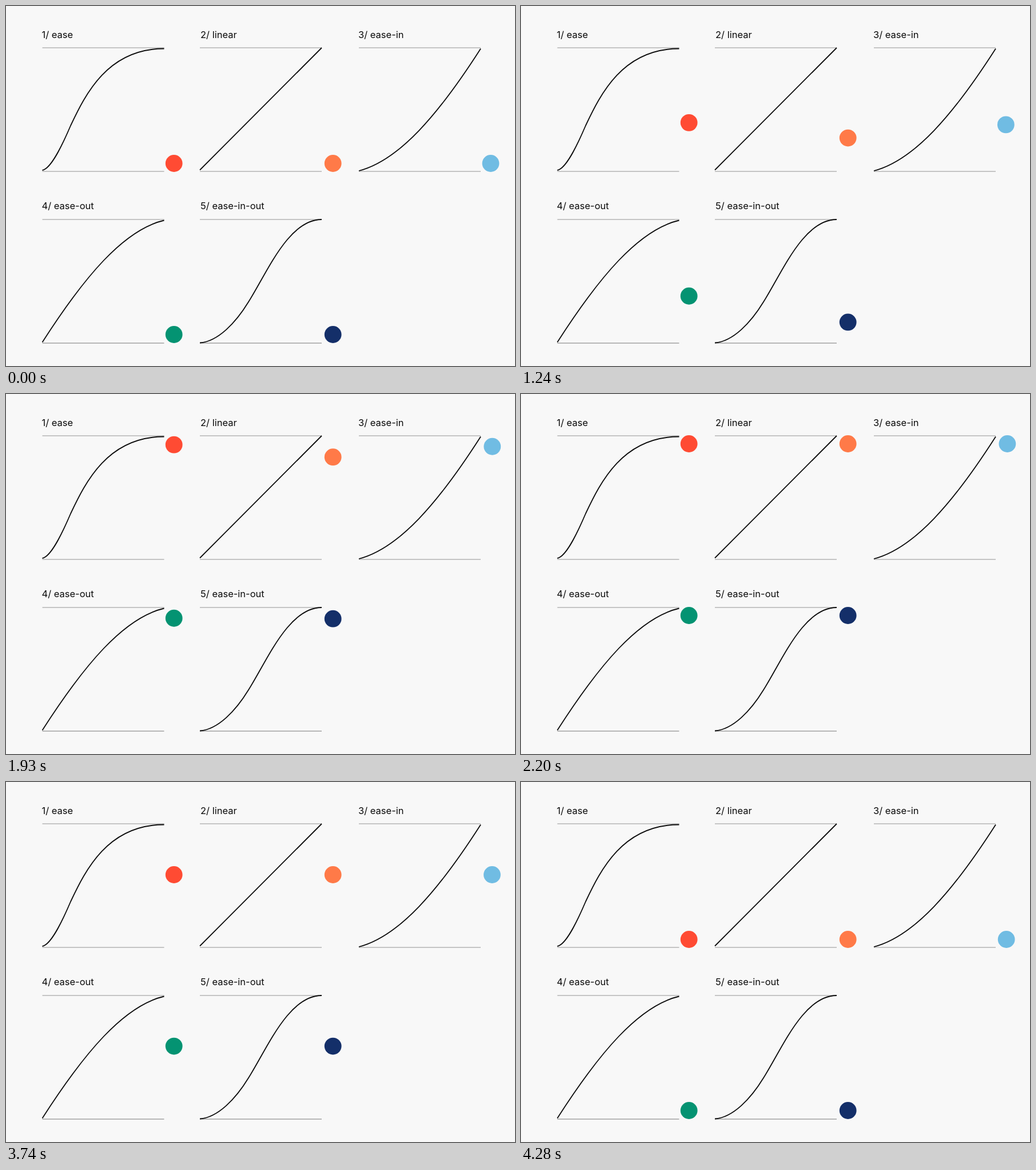
An HTML page that plays this animation: 890x629 px, repeating every 4310 ms.

```html
<!DOCTYPE html>
<html lang="en">
<head>
<meta charset="utf-8">
<title>Easing curves</title>
<style>
  html, body { margin: 0; width: 100%; height: 100%; overflow: hidden; background: #f8f8f8; }
  svg { display: block; width: 890px; height: 629px; }
  text { font: 400 16.5px Inter, "Open Sans", sans-serif; fill: #0b0b0b; }
  .rule { stroke: #b4b4b4; stroke-width: 1.3; }
  .rule.dark { stroke: #a2a2a2; }
  .curve { fill: none; stroke: #0c0c0c; stroke-width: 1.8; }
</style>
</head>
<body>
<svg viewBox="0 0 890 629"></svg>
<script>
const LOOP = 4310;
const STEP = 30;
const RISE = { start: 985, length: 1078 };
const FALL = { start: 3308, length: 980 };

// CSS-style cubic-bezier timing function
function bezier(x1, y1, x2, y2) {
  const at = (a, b, s) => 3 * (1 - s) * (1 - s) * s * a + 3 * (1 - s) * s * s * b + s * s * s;
  return x => {
    let low = 0, high = 1;
    for (let i = 0; i < 24; i++) {
      const mid = (low + high) / 2;
      if (at(x1, x2, mid) < x) low = mid; else high = mid;
    }
    return at(y1, y2, (low + high) / 2);
  };
}

const ease = bezier(.25, .1, .25, 1);
const linear = x => x;
const easeIn = bezier(.42, 0, 1, 1);
const easeOut = bezier(0, 0, .58, 1);
const easeInOut = bezier(.42, 0, .58, 1);

const charts = [
  { label: '1/ ease', x: 63.5, y: 73, dotX: 293.7, color: '#ff4b33', easing: ease,
    curve: 'M63.5 287C79 284 98 244 113 209C139 154 178 74.5 276.5 74.5' },
  { label: '2/ linear', x: 339, y: 73, dotX: 571.7, color: '#ff7a48', easing: linear,
    curve: 'M339 286.5L552 73' },
  { label: '3/ ease-in', x: 617, y: 73, dotX: 847.5, drift: 2.9, color: '#70bce3', easing: easeOut,
    curve: 'M617 288C687 270 756 190 830 74.5' },
  { label: '4/ ease-out', x: 63.5, y: 373, dotX: 293.7, color: '#049372', easing: easeOut,
    curve: 'M63.5 587.5C137 473 206 391 276.5 374.5' },
  { label: '5/ ease-in-out', x: 339, y: 373, dotX: 571.7, color: '#142f69', easing: easeInOut,
    curve: 'M339 588.5C371 586 402 553 424 517C457 465 494 373 552 373' }
];

const svg = document.querySelector('svg');

function add(tag, attributes, content = '') {
  const node = document.createElementNS('http://www.w3.org/2000/svg', tag);
  for (const name in attributes) node.setAttribute(name, attributes[name]);
  node.textContent = content;
  return svg.appendChild(node);
}

for (const chart of charts) {
  const { x, y } = chart;
  const lowerRow = y > 300;
  const rule = (ruleY, style) => add('line', { x1: x, x2: x + 213, y1: ruleY, y2: ruleY, class: style });
  add('text', { x: x === 339 ? 340 : x - 1, y: lowerRow ? 354.5 : 55.5 }, chart.label);
  rule(y, 'rule');
  rule(y + 216, lowerRow ? 'rule dark' : 'rule');
  add('path', { d: chart.curve, class: 'curve' });
  chart.top = lowerRow ? 387 : 87;
  chart.bottom = lowerRow ? 574 : 275;
  chart.dot = add('circle', { r: 14.9, fill: chart.color });
}

const progress = (time, phase) => Math.min(1, Math.max(0, (time - phase.start) / phase.length));

// The picture advances in 30 ms steps, counted anew for each movement
function snap(time) {
  if (time < 1000) return 0;
  const origin = time < 3200 ? 1000 : 3200;
  return origin + Math.floor((time - origin) / STEP) * STEP;
}

function draw(time) {
  const now = snap(time % LOOP);
  const up = progress(now, RISE);
  const down = progress(now, FALL);
  for (const { dot, dotX, drift = 0, top, bottom, easing } of charts) {
    const height = easing(up) - easeInOut(down);
    const shift = drift * (easeInOut(up) - .6 * easeIn(down));
    dot.setAttribute('cx', dotX + shift);
    dot.setAttribute('cy', bottom + (top - bottom) * height);
  }
}

const begin = performance.now();
function tick() {
  draw(performance.now() - begin);
  requestAnimationFrame(tick);
}
tick();
</script>
</body>
</html>
```
